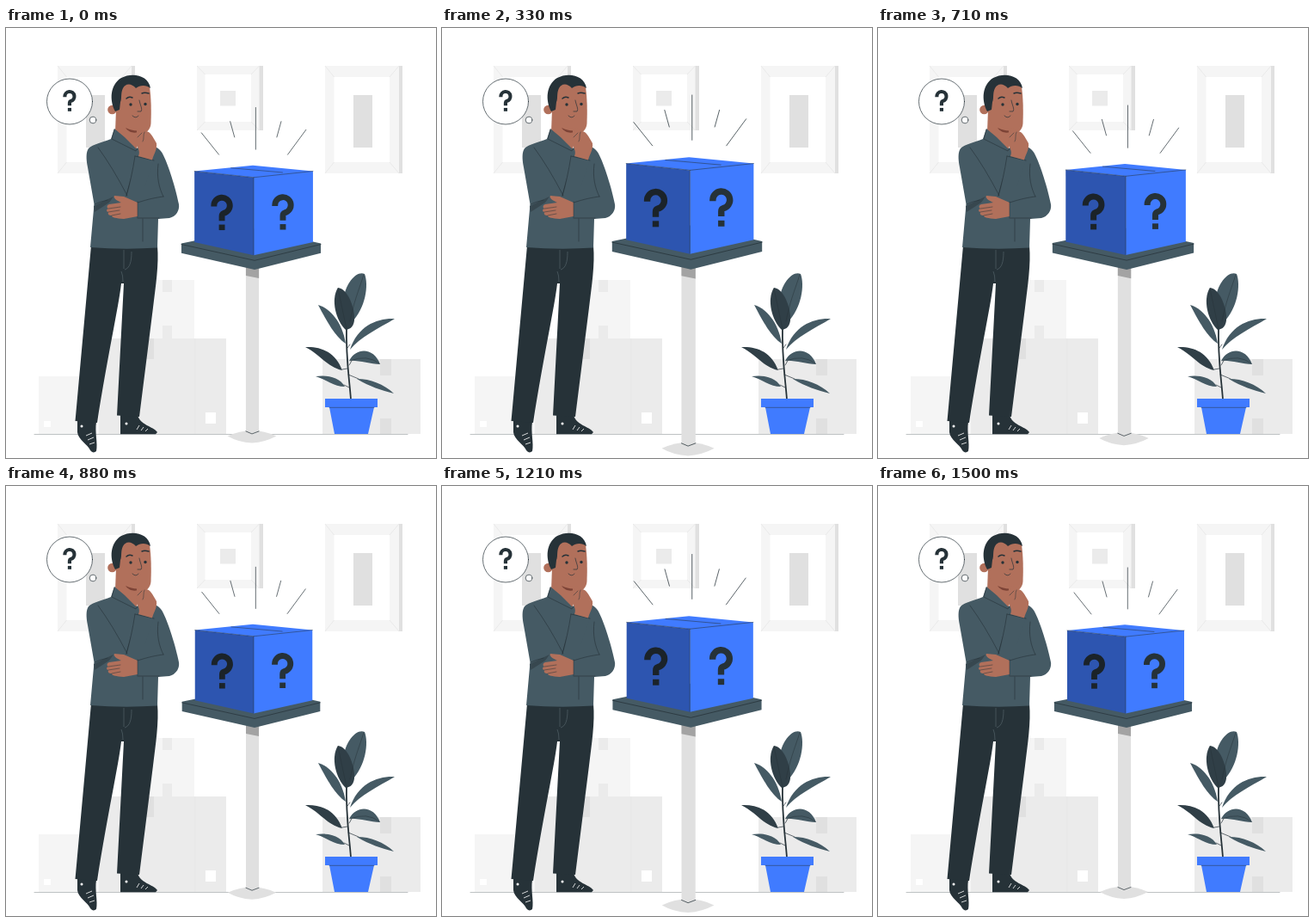
An HTML page that plays this animation: 500 by 500 pixels, repeating every 1.54 s.

```html
<!DOCTYPE html>
<html lang="en">
<head>
<meta charset="utf-8">
<title>Mystery box</title>
<style>
  html, body { margin: 0; width: 100%; height: 100%; overflow: hidden; background: #fff; }
  svg { display: block; width: 100%; height: 100%; }
  .ink { fill: none; stroke: #263238; stroke-width: .7; stroke-linecap: round; stroke-linejoin: round; }
  .thin { stroke-width: .5; }
  .dark { fill: #263238; }
  .slate { fill: #455a64; }
  .skin { fill: #b1705b; }
  .blue { fill: #407bff; }
  .g1 { fill: #f5f5f5; }
  .g2 { fill: #ebebeb; }
  .g3 { fill: #e0e0e0; }
  .white { fill: #fff; }
</style>
</head>
<body>
<svg viewBox="0 0 500 500">
  <defs>
    <g id="question">
      <path d="M3.400 13.500V12.500A9.100 9.100 0 1 1 14.500 21.300Q12.500 22 12.500 24.500V30" fill="none" stroke="currentColor" stroke-width="6.800"/>
      <path d="M9.100 34.300h6.800v6.400h-6.800z" fill="currentColor"/>
    </g>
    <g id="frame">
      <path class="g3" d="M85 0h5v125h-5z"/>
      <path class="g1" d="M0 0h86v125H0z"/>
      <path d="M0 0l10.500 13M86 0L75 13M0 125l10.500-13M86 125L75 112" stroke="#e4e4e4" stroke-width=".7"/>
      <path class="white" d="M10.500 13h64.500v99H10.500z"/>
      <path class="g3" d="M33 34h22v61H33z"/>
    </g>
  </defs>

  <g id="room">
    <use href="#frame" x="60" y="44"/>
    <use href="#frame" x="371" y="44"/>
    <path class="g3" d="M294 44h5v75h-5z"/>
    <path class="g1" d="M222 44h72.500v75H222z"/>
    <path d="M222 44l9.500 10M294.500 44L285 54M222 119l9.500-10M294.500 119L285 109" stroke="#e4e4e4" stroke-width=".7"/>
    <path class="white" d="M231.500 54h53.500v55h-53.500z"/>
    <path class="g2" d="M249 73h18v17.500h-18z"/>

    <path class="g1" d="M150 293h69v68h-69zM38 405h70v67H38z"/>
    <path class="g2" d="M182 293h11v14h-11zM182 346h11v15h-11zM108 361h148v111H108zM368 385h114v87H368z"/>
    <path class="g3" d="M163 361h9v24h-9zM435 385h13v19h-13zM435 454h13v18h-13z"/>
    <path d="M220 361v111" stroke="#e4e4e4" stroke-width=".7"/>
    <path class="white" d="M44 457h8v7h-8zM232 447h12v13h-12z"/>
    <path class="ink thin" d="M33 472.500H467" opacity=".6"/>
  </g>

  <g id="plant">
    <path class="ink" d="M401 432C399 405 395 385 396 345" style="stroke-width:1.800"/>
    <path class="ink" d="M397 372L400 368M397 396L391 397M399 392L402 387M399 418L393 415M398 403L410 408"/>
    <g class="slate">
      <path d="M393 312C396 297 407 282 417 286C422 299 418 326 402 342C394 336 389 322 393 312Z"/>
      <path d="M363 322C377 326 391 342 395 367C383 359 374 343 363 322Z"/>
      <path d="M452 338C432 337 409 346 400 374C412 359 432 350 452 338Z"/>
      <path d="M399 387C407 371 428 371 435 391C423 391 410 386 399 387Z"/>
      <path d="M360 405C374 403 388 406 394 417C381 417 373 409 360 405Z"/>
      <path d="M408 408C424 408 439 414 451 425C436 421 423 417 408 408Z"/>
    </g>
    <g fill="#303f47">
      <path d="M386 302C397 303 406 325 405 340C404 347 401 350 395 351C384 341 377 316 386 302Z"/>
      <path d="M348 371C365 370 383 376 391 398C373 394 366 380 348 371Z"/>
    </g>
    <path class="ink thin" d="M416 287C410 305 404 320 400 341M386 303L396 350M400 387Q420 379 434 390"/>
    <path class="blue" d="M371 431h61v10h-4L421 472H382L376 441H371z"/>
    <path class="ink thin" d="M376 441.300H428"/>
  </g>

  <g id="man">
    <path class="dark" d="M83 456L105 458C103 470 107 483 105 492C103 494 100 494 98 491C95 484 84 479 83 470Z"/>
    <path class="dark" d="M133 450H153C156 462 171 463 176 470L174 472.300H133Z"/>
    <path d="M93 474l7-3M95 479l7-3M97 484l6-2M155 462l-3 5M160 464l-3 4M165 466l-3 3" stroke="#fff" stroke-width=".8"/>
    <circle class="white" cx="88" cy="463" r="1.500"/><circle class="white" cx="140" cy="460" r="1.500"/>
    <path class="dark" d="M99 253H176C178 275 174 300 171 325L155 452L129 450.500L137 297H134C131 324 118 382 106 459L80.500 457Z"/>
    <path d="M146 260C146 272 144 279 138 281M137 258v22M136 295Q136 287 134 283" fill="none" stroke="#5b6a71" stroke-width=".6"/>

    <path class="skin" d="M128 95L127 121L151 143L158 122Z"/>
    <circle class="skin" cx="123.500" cy="95" r="5.300"/>
    <path class="skin" d="M130 75C138 60 160 60 167 68C169 82 169 97 168.500 111C168 120 160 125 151 124C140 122 131 114 128 100Z"/>
    <path class="dark" d="M127 97C120 84 121 66 134 58C147 51 166 55 168 70C163 66 156 66 151 70C146 64 139 64 136 70C133 76 135 82 133 86L132 95Z"/>
    <path d="M139 116C145 124 153 122 157 119C151 120 145 119 139 116Z" fill="#7c4336"/>
    <path class="ink" d="M155 84C156 90 159 94 157 97L153 97M147 102Q151 106 154 102"/>
    <path class="ink" d="M140 82Q143 79 147 81M158 76Q161 74.500 166 76" style="stroke-width:1.500"/>
    <circle class="dark" cx="145" cy="89" r="1.700"/><circle class="dark" cx="162" cy="88.500" r="1.700"/>

    <path class="slate" d="M126 117L122 129C112 133 101 135 96 140C93 144 93 152 95 162L102.500 205L98 255Q137 258 176 255.500L177 222L190 221C198 219 202 212 201 205C197 185 189 160 183 148C180 141 175 138 169 137L151 140L138 127Z"/>
    <path class="ink" d="M126 118L123 129L151 143L155 137M107 139Q124 162 141 195M153 149Q145 175 140 195M153 203C165 199 175 197 183 196M177 158C175 174 178 186 183 196M153 221H178M159 222V248" style="stroke-width:.6"/>
    <path d="M102 207L125 196L120 203L103 214Z" fill="#37474f"/>
    <path class="slate" d="M150 149L172 154L161 185L141 195Z"/>
    <path class="ink" d="M150 149L172 154M150 149Q146 175 140 195M103 205Q109 202 118 200" style="stroke-width:.6"/>
    <path class="skin" d="M152 119C155 114 159 116 161 121C166 118 170 125 175 134C176 142 171 148 170 153.500L154 149C157 142 151 139 152 130Z"/>
    <path class="ink thin" d="M161 121C159 125 161 129 159 132M153 127L158 122"/>
    <path class="skin" d="M153 203L137 196L126 195C124 198 130 201 134 203L120 205C117 206 117 209 119 210C116 211 117 214 119 214C118 217 120 218 123 218C123 221 128 221 137 222L153 219Z"/>
    <path class="ink thin" d="M153 202V220M119 210L133 208M119 214L132 212M123 218L133 216"/>
  </g>

  <g id="thought" color="#263238">
    <circle class="ink" cx="74" cy="85.500" r="26.500" style="fill:#fff"/>
    <circle class="ink" cx="101" cy="107" r="3.800" style="fill:#fff"/>
    <use href="#question" transform="translate(66.300 72) scale(.61)"/>
  </g>

  <g id="stand">
    <path class="g3" d="M258 472Q286 459 314 472Q301 479 286 480Q270 479 258 472Z"/>
    <path class="g3" d="M279 274H294V467L286 470L279 467Z"/>
    <path fill="#a3a3a3" d="M279 276H294V291L279 288Z"/>
    <path class="ink" d="M279 466.500L286 469.500L294 466.500"/>
    <path class="slate" d="M205 251L288 234L365 251V262L289 281L205 262Z"/>
    <path class="ink" d="M205 252L289 270.500L365 252"/>
    <path fill="#2d55b0" d="M220 168L288 175.200V264.500L220 249.500Z"/>
    <path class="blue" d="M220 168L287 161.300L356 168V249.500L288 264.500V175.200Z"/>
    <path class="ink thin" d="M220 168L288 175.200L356 168M288 175.200V264M262 164.300L321 169.500"/>
    <use href="#question" transform="translate(239 195)" color="#1b2329"/>
    <use href="#question" transform="translate(309 194.500)" color="#263238"/>
    <path class="ink" d="M228 124L248 149M261 111L266 129M290.300 95V143M319.500 111L314.500 129M348 120.500L327 149"/>
  </g>
</svg>
<script>
  const LOOP = 1540, CX = 285, CY = 284.5;
  // [time in ms, scale], linear between keys
  const pulse = [[-40, 1], [270, 1.1], [870, 1], [1148, 1.1], [1500, 1], [1810, 1.1]];
  const stand = document.getElementById("stand");

  function scaleAt(t) {
    const i = pulse.findIndex(([time]) => time > t);
    const [t0, s0] = pulse[i - 1], [t1, s1] = pulse[i];
    return s0 + (s1 - s0) * (t - t0) / (t1 - t0);
  }

  function draw() {
    const s = scaleAt(performance.now() % LOOP);
    stand.setAttribute("transform", `translate(${CX} ${CY}) scale(${s}) translate(${-CX} ${-CY})`);
    requestAnimationFrame(draw);
  }
  draw();
</script>
</body>
</html>
```
